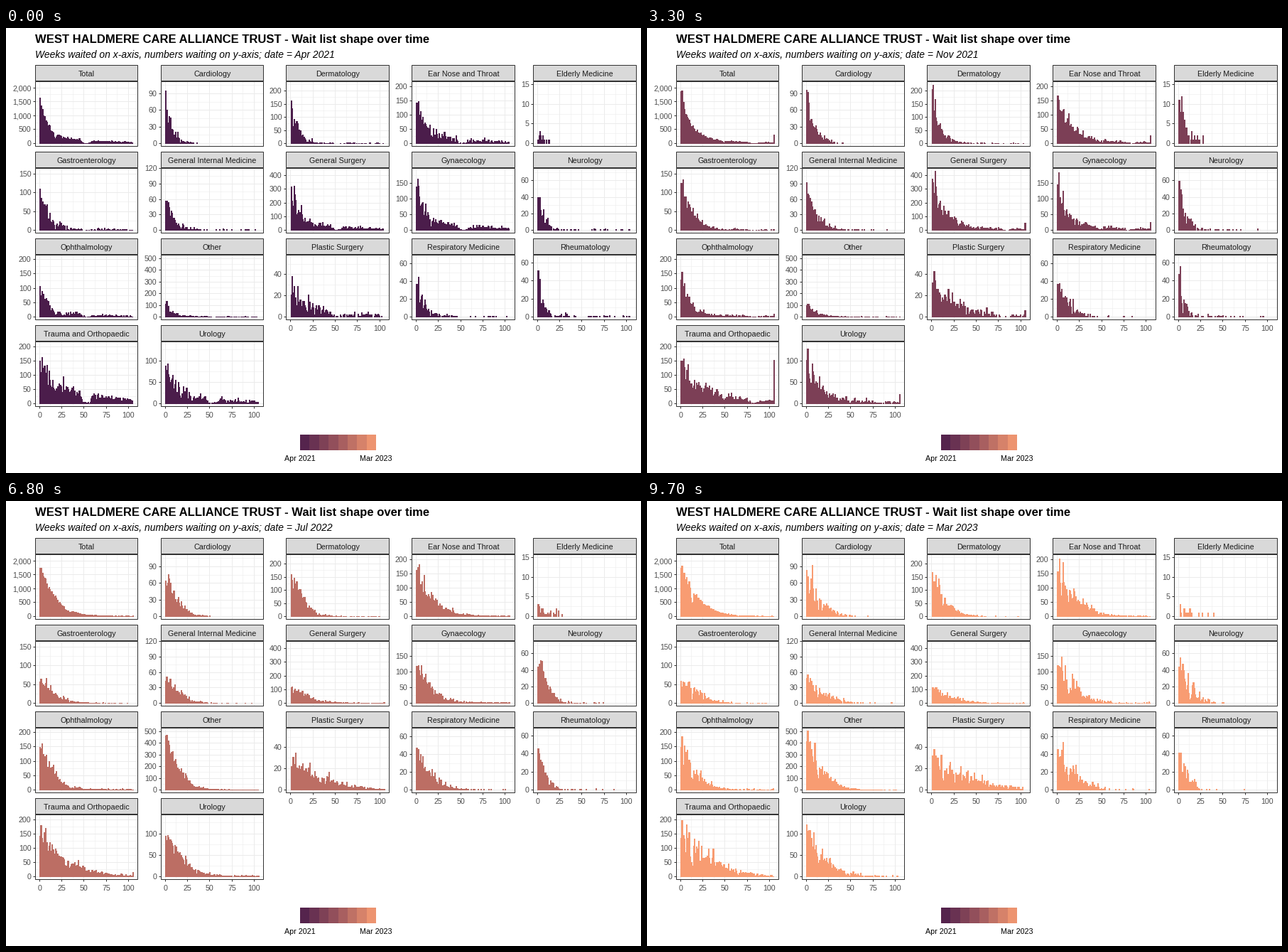
These frames come from a looping animation (894 by 626 pixels, 10000 ms). A matplotlib script:

```python
import numpy as np
import matplotlib.pyplot as plt
from matplotlib.animation import FuncAnimation
from matplotlib.collections import LineCollection, PolyCollection
from matplotlib.colors import LinearSegmentedColormap
from matplotlib.patches import Rectangle

WIDTH, HEIGHT, DPI = 894, 626, 100
PT_PER_PX = 72 / DPI
N_MONTHS, FRAMES, INTERVAL = 24, 100, 100
WEEKS = np.arange(1, 106)
WEEKS_PER_MONTH = 4.35
PX_PER_WEEK = 1.2555
COLUMN_X = (47, 224, 400.7, 577.3, 748.2)   # pixel of week 0 in each column
ROW_PITCH, PLOT_HEIGHT = 122, 83.2
MONTH_NAMES = "Jan Feb Mar Apr May Jun Jul Aug Sep Oct Nov Dec".split()
CMAP = LinearSegmentedColormap.from_list("wait", ["#4b1d4b", "#9c565d", "#f89c72"])

plt.rcParams["font.family"] = "Liberation Sans"

# name: axis maximum, newest-week peak (start, middle, end), typical wait, long-wait share
SPECIALTIES = {
    "Cardiology": (107, (92, 86, 74), 16, 0),
    "Dermatology": (225, (155, 195, 165), 16, .02),
    "Ear Nose and Throat": (208, (150, 195, 160), 22, .2),
    "Elderly Medicine": (15, (2, 11, 2), 16, 0),
    "Gastroenterology": (157, (105, 145, 62), 20, .06),
    "General Internal Medicine": (114.5, (67, 109, 50), 19, .02),
    "General Surgery": (432, (300, 425, 115), 22, .18),
    "Gynaecology": (188, (146, 146, 130), 19, .22),
    "Neurology": (71.5, (48, 62, 52), 13, .02),
    "Ophthalmology": (205, (115, 132, 158), 17, .15),
    "Other": (507, (95, 118, 460), 18, .06),
    "Plastic Surgery": (55.8, (28, 39, 26), 42, .2),
    "Respiratory Medicine": (66.5, (33, 49, 45), 20, .02),
    "Rheumatology": (65.3, (44, 52, 45), 10, .03),
    "Trauma and Orthopaedic": (206.5, (140, 165, 140), 34, .5),
    "Urology": (137.5, (95, 122, 108), 21, .22),
}
TOTAL_MAX = 2120


def wait_curve(month, peaks, wait, long_share):
    """A spike of new arrivals, a shoulder that widens, and a fading long tail."""
    peak = np.interp(month, (0, 9, 13, 15, 23), np.repeat(peaks, (1, 2, 2)))
    tail = long_share * np.exp(-month / 12)
    spike = (1 - tail) * np.interp(month, (13, 15), (.45, .2))
    reach = wait * (.75 + .5 * month / (N_MONTHS - 1))
    return peak * (spike * np.exp(-(WEEKS - 1) / 2.5)
                   + (1 - spike - tail) * np.exp(-(WEEKS / reach) ** 1.6)
                   + tail * np.exp(-WEEKS / 60))


def referral_level(cohort):
    """Fewer referrals each Christmas and in the long closure before the series."""
    level = 1 - .9 * np.exp(-((cohort - 53) / 6) ** 4)
    for christmas in (18, -34.5, -87):
        level *= 1 - .55 * np.exp(-((cohort - christmas) / 1.7) ** 2)
    return level


def simulate(rng, y_max, peaks, wait, long_share):
    """Counts by month and week; dips and noise travel right as cohorts age."""
    mood = rng.normal(0, .2, 260)
    counts = np.zeros((N_MONTHS, len(WEEKS)))
    for month in range(N_MONTHS):
        cohort = WEEKS - WEEKS_PER_MONTH * month
        noise = mood[np.round(cohort + 120).astype(int)]
        noise[0] = 0
        curve = wait_curve(month, peaks, wait, long_share)
        counts[month] = rng.poisson(curve * referral_level(cohort) * np.exp(noise))
        # Everyone past two years gathers in the last bar.
        backlog = 4.7 * long_share ** 2 * peaks[1]
        counts[month, -1] = round(backlog * np.interp(month, (0, 9, 16), (0, 1, 0)))
    return np.minimum(counts, y_max)


def tick_step(y_max):
    """Round step giving three to five labels."""
    ideal = y_max / 3.4
    scale = 10 ** np.floor(np.log10(ideal))
    return int(scale * min((1, 2, 3, 5, 10), key=lambda n: abs(n * scale - ideal)))


rng = np.random.default_rng(2021)
counts = [simulate(rng, *spec) for spec in SPECIALTIES.values()]
counts = np.array([np.minimum(sum(counts), TOTAL_MAX)] + counts)
names = ["Total", *SPECIALTIES]
y_maxima = [TOTAL_MAX] + [spec[0] for spec in SPECIALTIES.values()]

fig = plt.figure(figsize=(WIDTH / DPI, HEIGHT / DPI), dpi=DPI, facecolor="white")
ax = fig.add_axes([0, 0, 1, 1])
ax.set(xlim=(0, WIDTH), ylim=(HEIGHT, 0))
ax.axis("off")


def pixel(value):
    return np.floor(value) + .5


def label(x, baseline, text, px, color="black", **style):
    return ax.text(x, baseline, text, fontsize=px * PT_PER_PX, color=color,
                   va="baseline", **style)


def box(left, top, right, bottom, fill, edge="none", zorder=3):
    ax.add_patch(Rectangle((left, top), right - left, bottom - top, facecolor=fill,
                           edgecolor=edge, lw=0 if edge == "none" else PT_PER_PX,
                           snap=False, zorder=zorder))


def add_lines(segments, color, px, zorder):
    lines = LineCollection(segments, colors=color, zorder=zorder,
                           linewidths=px * PT_PER_PX, capstyle="butt")
    lines.set_snap(False)
    ax.add_collection(lines)


major, minor, ticks, origins = [], [], [], []
for i, (name, y_max) in enumerate(zip(names, y_maxima)):
    row, col = divmod(i, len(COLUMN_X))
    x0, shift = COLUMN_X[col], row * ROW_PITCH
    left = pixel(x0 - 4.695 * PX_PER_WEEK)
    right = pixel(x0 + 110.695 * PX_PER_WEEK)
    top, bottom, base = 75.5 + shift, 166.5 + shift, 162.6 + shift
    scale = PLOT_HEIGHT / y_max
    origins.append((x0, base, scale))

    box(left, 52.5 + shift, right, 74.5 + shift, "#d9d9d9", "#333333", 5)
    box(left, top, right, bottom, "none", "#333333", 5)
    label((left + right) / 2, 67.5 + shift, name, 10.75, "#1a1a1a",
          ha="center", zorder=6)

    step = tick_step(y_max)
    for k in range(20):
        y = pixel(base - k * step / 2 * scale)
        if y < top:
            break
        (minor if k % 2 else major).append([(left, y), (right, y)])
        if k % 2 == 0:
            ticks.append([(left - 3, y), (left, y)])
            label(left - 6, y + 3.8, f"{k // 2 * step:,}", 10.6, "#4d4d4d", ha="right")

    for k in range(9):
        x = pixel(x0 + 12.5 * k * PX_PER_WEEK)
        (minor if k % 2 else major).append([(x, top), (x, bottom)])
        if k % 2 == 0 and i + len(COLUMN_X) >= len(names):
            ticks.append([(x, bottom), (x, bottom + 3)])
            label(x, bottom + 15, f"{k * 25 // 2}", 10.6, "#4d4d4d", ha="center")

add_lines(minor, "#ebebeb", .55, 1)
add_lines(major, "#ebebeb", 1, 2)
add_lines(ticks, "#333333", 1, 4)

label(41, 20.5, "WEST HALDMERE CARE ALLIANCE TRUST - Wait list shape over time",
      16.65, weight="bold")
subtitle = label(41, 42, "", 13.87, style="italic")

edges = np.round(np.linspace(414, 521, 9))
for k in range(8):
    box(edges[k], 572, edges[k + 1], 594, CMAP((k + .5) / 8))
label(413.7, 609.3, "Apr 2021", 10.7, ha="center")
label(521, 609.3, "Mar 2023", 10.7, ha="center")

# One quad per bar: left, left, right, right.
x0s, bases, scales = (np.array(v)[:, None] for v in zip(*origins))
quads = np.zeros((len(names), len(WEEKS), 4, 2))
quads[..., :2, 0] = (x0s + (WEEKS - .45) * PX_PER_WEEK)[..., None]
quads[..., 2:, 0] = (x0s + (WEEKS + .45) * PX_PER_WEEK)[..., None]
quads[..., 1] = bases[..., None]
bars = PolyCollection(quads.reshape(-1, 4, 2), linewidths=0, zorder=3,
                      antialiaseds=False)
bars.set_snap(False)
ax.add_collection(bars)


def month_position(frame):
    """Month shown, halfway between two during the single tween frame."""
    starts = [min(5 * m, 4 * m + 4) for m in range(1, N_MONTHS)]
    month = sum(s <= frame for s in starts)
    return month - .5 if frame in starts else month


def draw(frame):
    position = month_position(frame)
    before, after = int(np.floor(position)), int(np.ceil(position))
    heights = (counts[:, before] + counts[:, after]) / 2 * scales
    quads[..., 1:3, 1] = (bases - heights)[..., None]
    bars.set_verts(quads.reshape(-1, 4, 2))
    bars.set_facecolor(CMAP(position / (N_MONTHS - 1)))
    year, month = divmod(before + 3, 12)
    subtitle.set_text("Weeks waited on x-axis, numbers waiting on y-axis; "
                      f"date = {MONTH_NAMES[month]} {2021 + year}")
    return bars, subtitle


anim = FuncAnimation(fig, draw, frames=FRAMES, interval=INTERVAL, repeat=True,
                     repeat_delay=0, blit=False)
plt.show()
```
